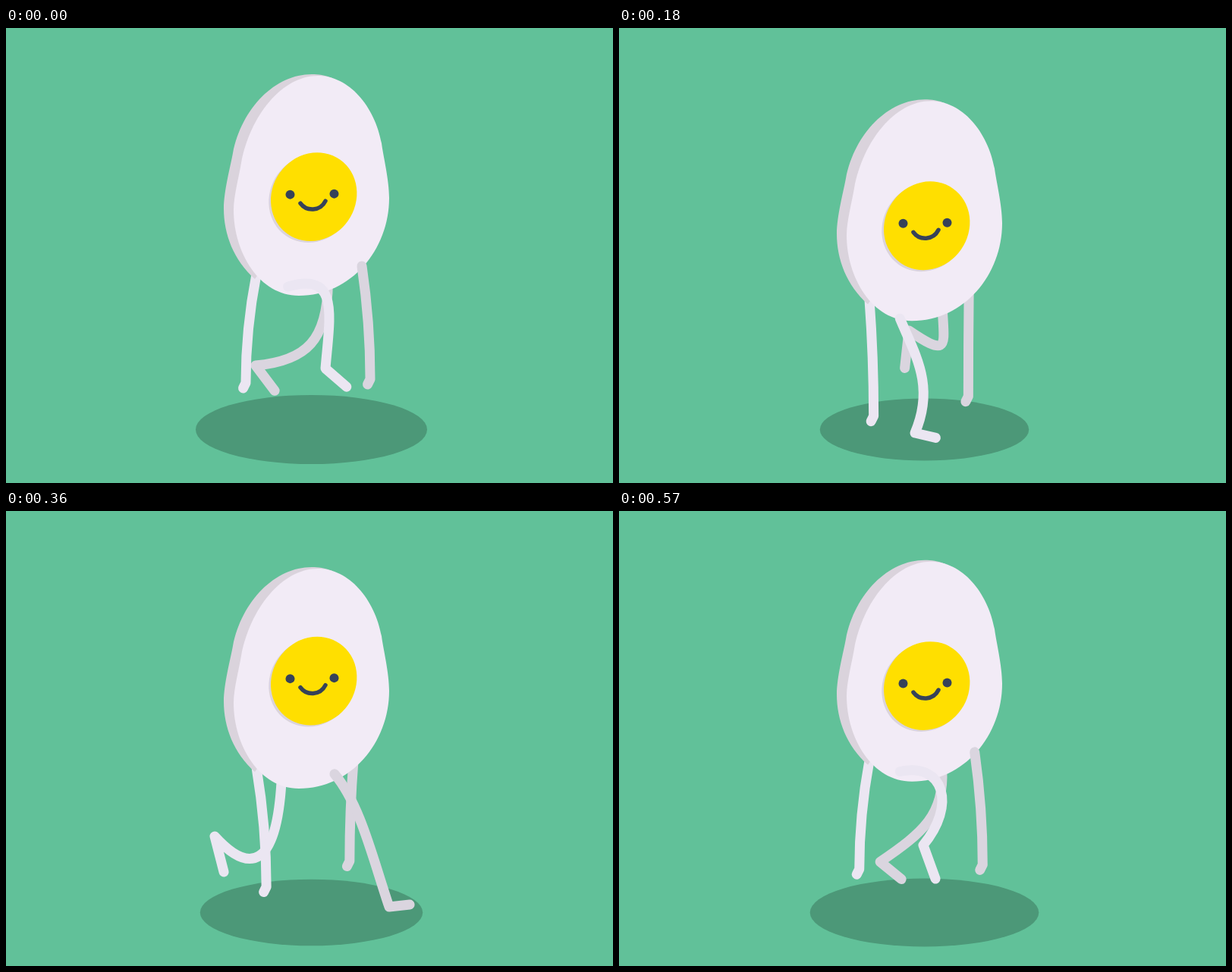
Animation, 800 px wide and 600 px high, one loop 0.6 s. Source, as an HTML page with a canvas:

```html
<!DOCTYPE html>
<html lang="en">
<head>
<meta charset="utf-8">
<title>Walking egg</title>
<style>
  html, body { margin: 0; width: 100%; height: 100%; overflow: hidden; background: #61c199; }
  canvas { display: block; }
</style>
</head>
<body>
<canvas id="stage" width="800" height="600"></canvas>
<script>
const ctx = document.getElementById('stage').getContext('2d');
const LOOP = 600, STEP = 30, LIMB = 13;
const { sin, cos, PI } = Math;
const color = {
  back: '#61c199', shadow: '#4c9878', egg: '#f2ebf6', rim: '#dad3dc',
  near: '#ebe6f2', far: '#dad5df', yolk: '#ffdf00', face: '#364259'
};

const eggRim = new Path2D('M430 66C420 62 412 61 403 61C355 61 311 105 299 165C296 182 287 215 287 238C287 272 300 306 328 331L420 200Z');
const eggFront = new Path2D('M411 63C452 63 486 103 495 152C497 168 505 200 505 224C505 292 455 353 386 353C334 353 300 296 300 240C300 222 307 196 310 178C322 115 364 63 411 63Z');
const smile = new Path2D('M388 230C396 241 414 241 421 227');

// Closed track of the ankle, evenly spaced over one stride
const ankleTrack = [
  [421, 449], [445, 533], [428, 536], [390, 534], [310, 493],
  [269, 456], [275, 429], [294, 413], [322, 410], [377, 439]
];

const angle = time => 2 * PI * time / LOOP;
const radians = degrees => degrees * PI / 180;

// Once per loop from 0 up to 1 and back; a higher power is a shorter pulse
const pulse = (time, peak, power) => ((1 + cos(angle(time - peak))) / 2) ** power;

// 0 at the top of a bounce, 1 at the bottom
function bounce(time) {
  const p = (time + LOOP) % 300 / 150;
  const u = p < 1 ? p : 2 - p;
  return u * u * (3 - 2 * u);
}

const eggTop = time => 61 + 37 * bounce(time);

// Smooth position on a closed track
function follow(track, time) {
  const n = track.length;
  const place = time % LOOP / LOOP * n;
  const i = Math.floor(place), u = place - i;
  const [p, q, r, s] = [-1, 0, 1, 2].map(k => track[(i + k + n) % n]);
  return q.map((v, j) => v + u / 2 * (r[j] - p[j]
    + u * (2 * p[j] - 5 * v + 4 * r[j] - s[j] + u * (3 * (v - r[j]) + s[j] - p[j]))));
}

function legPose(time) {
  const a = angle(time);
  const lift = pulse(time, 590, 16);
  const kick = pulse(time, 375, 6);
  const shin = radians(64 - 33 * cos(a) - 70 * sin(a) - 12 * cos(2 * a) - 10 * sin(3 * a) - 15 * lift);
  const pitch = radians(47 - 6 * cos(a) - 50 * sin(a) - 13 * sin(2 * a) - 7 * sin(3 * a));
  const foot = 27 + 23 * sin(pitch) ** 2;

  const hip = [368 + 5 * cos(angle(time - 75)), eggTop(time) + 283 + 6 * sin(a - 0.5)];
  const ankle = follow(ankleTrack, time);
  return {
    hip, ankle,
    thighPull: [hip[0] + 11 + 18 * cos(angle(time - 80)) + 48 * lift, hip[1] + 48 + 70 * kick - 72 * lift],
    shinPull: [ankle[0] + 68 * sin(shin), ankle[1] - 68 * cos(shin)],
    toe: [ankle[0] + foot * cos(pitch), ankle[1] + foot * sin(pitch)]
  };
}

function line(style, width) {
  ctx.strokeStyle = style;
  ctx.lineWidth = width;
  ctx.lineCap = ctx.lineJoin = 'round';
}

function drawLeg(time, dx, dy, style) {
  const leg = legPose(time);
  ctx.save();
  ctx.translate(dx, dy);
  line(style, LIMB);
  ctx.beginPath();
  ctx.moveTo(...leg.hip);
  ctx.bezierCurveTo(...leg.thighPull, ...leg.shinPull, ...leg.ankle);
  ctx.lineTo(...leg.toe);
  ctx.stroke();
  ctx.restore();
}

function drawArm(sx, sy, wx, tipY, style) {
  const wy = tipY - 7;
  line(style, LIMB);
  ctx.beginPath();
  ctx.moveTo(sx, sy);
  ctx.quadraticCurveTo(wx, (sy + wy) / 2, wx, wy);
  ctx.lineTo(wx - 3.5, tipY);
  ctx.stroke();
}

function fill(path, style) {
  ctx.fillStyle = style;
  ctx.fill(path);
}

function oval(x, y, rx, ry, style, turn = 0) {
  ctx.fillStyle = style;
  ctx.beginPath();
  ctx.ellipse(x, y, rx, ry, turn, 0, 2 * PI);
  ctx.fill();
}

function drawBody(drop, yolkDrop) {
  ctx.save();
  ctx.translate(0, drop);
  fill(eggRim, color.rim);
  fill(eggFront, color.egg);
  ctx.restore();

  ctx.save();
  ctx.translate(0, yolkDrop);
  oval(403, 223.5, 60, 55, color.rim, radians(-55));
  oval(405.7, 221.5, 60, 55, color.yolk, radians(-55));
  oval(374.5, 218.5, 6, 6, color.face);
  oval(432.5, 217.5, 6, 6, color.face);
  line(color.face, 5.5);
  ctx.stroke(smile);
  ctx.restore();
}

const legInFront = time => time % LOOP >= 510 || time % LOOP < 225;

function draw(time) {
  const b = bounce(time);
  const top = eggTop(time);
  const swing = cos(angle(time));
  // The yolk trails the egg, by a little more on every other step
  const yolkDrop = 43 * bounce(time - 18.5 + 4 * swing) + 2.4 * swing - 2.4;

  const nearLeg = () => drawLeg(time, 0, 0, color.near);
  const farLeg = () => drawLeg(time + LOOP / 2, 60, -11, color.far);
  const nearArm = () => drawArm(330, top + 264, 331 - 15 * swing, top + 422 - 8 * swing, color.near);
  const farArm = () => drawArm(463 + 6 * swing, top + 253, 465 + 15 * swing, top + 401 + 8 * swing, color.far);

  const nearFront = legInFront(time);
  const farFront = legInFront(time + LOOP / 2);
  const armFront = swing > 0.5;

  ctx.fillStyle = color.back;
  ctx.fillRect(0, 0, 800, 600);
  oval(402.5, 529.5, 152.5 - 16.5 * b, 45.5 - 5 * b, color.shadow);

  if (!armFront) farArm();
  if (!farFront) farLeg();
  nearArm();
  if (!nearFront) nearLeg();
  drawBody(top - 61, yolkDrop);
  if (armFront) farArm();
  if (farFront) farLeg();
  if (nearFront) nearLeg();
}

const start = performance.now();
function tick() {
  const time = (performance.now() - start) % LOOP;
  draw(Math.floor(time / STEP) * STEP);
  requestAnimationFrame(tick);
}
tick();
</script>
</body>
</html>
```
